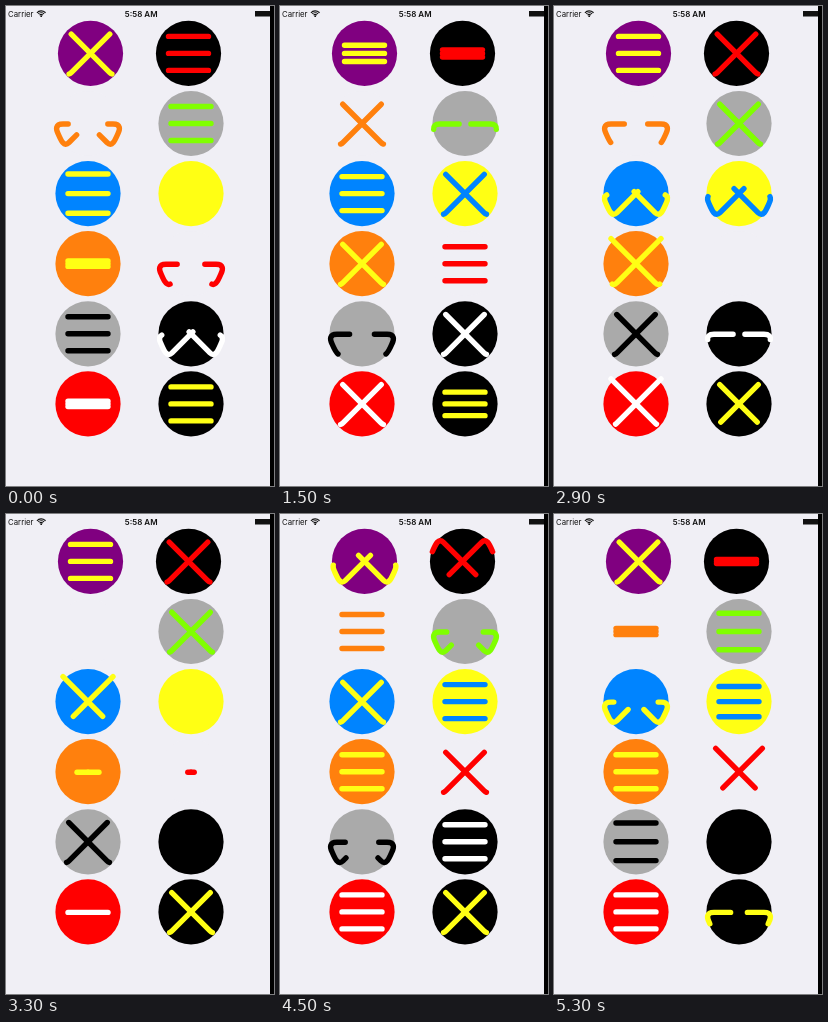
An HTML page with a canvas for the animation above (5400 ms loop, 268 px wide and 480 px high).

```html
<!DOCTYPE html>
<html lang="en">
<head>
<meta charset="utf-8">
<title>Menu buttons</title>
<style>
  html, body { margin: 0; width: 100%; height: 100%; overflow: hidden; background: #f0eff5; }
  canvas { display: block; width: 268px; height: 480px; }
</style>
</head>
<body>
<canvas id="stage"></canvas>
<script>
const W = 268, H = 480, LOOP = 5400, STEP = 100;
const canvas = document.getElementById('stage');
const ctx = canvas.getContext('2d');
const ratio = window.devicePixelRatio || 1;
canvas.width = W * ratio;
canvas.height = H * ratio;

const BACK = '#f0eff5', PURPLE = '#800080', YELLOW = '#ffff14', RED = '#ff0000',
  ORANGE = '#ff800d', BLUE = '#0084ff', GRAY = '#aaaaaa', GREEN = '#80ff00',
  BLACK = '#000', WHITE = '#fff';

// The arm runs from the centre to the rim, round the corner and up a diagonal.
const arm = new Path2D(
  'M0 0.5 L-25 0.5 C-33 0.5 -32 6 -30 10 C-27 17 -24 24 -19 19 L25 -25');
const mirroredArm = new Path2D();
mirroredArm.addPath(arm, new DOMMatrix([-1, 0, 0, 1, 0, 0]));

const GAP = 17;                      // spacing of the resting bars
const CROSS = { tail: 53.5, head: 110.5 };  // part of the arm that forms the cross
const COLLAPSE = 360, SWEEP = 1220, TAIL_DELAY = 80;
const TOTAL = COLLAPSE + TAIL_DELAY + SWEEP;
const SPREAD = { start: 1180, show: 1300, length: 420 };

// Cubic Bezier (0.5, -0.8, 0.5, 1.85): pulls back first, then overshoots.
function swing(x) {
  if (x <= 0) return 0;
  if (x >= 1) return 1;
  let low = 0, high = 1;
  for (let i = 0; i < 24; i++) {
    const mid = (low + high) / 2;
    if (mid * (1.5 - 1.5 * mid + mid * mid) < x) low = mid;
    else high = mid;
  }
  const s = low, r = 1 - s;
  return s * (-2.4 * r * r + 5.55 * r * s + s * s);
}

// Taps alternate between opening to a cross and closing to bars.
const button = (fill, ink, opensFirst, taps, extra) => ({ fill, ink, opensFirst, taps, ...extra });
const buttons = [
  button(PURPLE, YELLOW, false, [115, 3420], { dx: 2.5 }),
  button(BLACK, RED, true, [1180, 3960], { dx: -2.5, closesUpward: true }),
  button(BACK, ORANGE, true, [-1000, 2185, 4975]),
  button(GRAY, GREEN, true, [600, 3830]),
  button(BLUE, YELLOW, false, [-1500, 1840, 4655]),
  button(YELLOW, BLUE, true, [-450, 2315, 5180]),
  button(ORANGE, YELLOW, true, [-330, 2455]),
  button(BACK, RED, false, [-700, 2520, 5180]),
  button(GRAY, BLACK, true, [550, 3820]),
  button(BLACK, WHITE, true, [-1060, 2140, 4850]),
  button(RED, WHITE, true, [-330, 2490]),
  button(BLACK, YELLOW, true, [1300, 4560])
];

function phaseOf({ opensFirst, taps }, t) {
  const done = taps.filter(tap => tap <= t).length;
  const opening = opensFirst === (done % 2 === 1);
  return { opening, age: done ? t - taps[done - 1] : LOOP };
}

function drawBars(gap) {
  ctx.beginPath();
  for (const y of [-gap, 0, gap]) {
    ctx.moveTo(-20, y);
    ctx.lineTo(20, y);
  }
  ctx.stroke();
}

// Closing plays the same sweep backwards.
function drawArms(t) {
  const tail = Math.max(0, CROSS.tail * swing((t - COLLAPSE - TAIL_DELAY) / SWEEP));
  const head = CROSS.head * swing((t - COLLAPSE) / SWEEP);
  if (head <= tail) return;
  ctx.setLineDash([head - tail, 500]);
  ctx.lineDashOffset = -tail;
  ctx.stroke(arm);
  ctx.stroke(mirroredArm);
  ctx.setLineDash([]);
}

function drawIcon(opening, age) {
  if (opening && age < COLLAPSE) drawBars(GAP * (1 - (age / COLLAPSE) ** 2));
  else if (opening) drawArms(age);
  else if (age < SPREAD.show) drawArms(TOTAL - age);
  else drawBars(GAP * Math.max(0, swing((age - SPREAD.start) / SPREAD.length)));
}

function drawButton(item, index, t) {
  const { opening, age } = phaseOf(item, t);
  ctx.save();
  ctx.translate((index % 2 ? 185 : 82) + (item.dx || 0), 47.4 + 70.1 * Math.floor(index / 2));
  ctx.fillStyle = item.fill;
  ctx.beginPath();
  ctx.arc(0, 0, 32.6, 0, Math.PI * 2);
  ctx.fill();

  ctx.strokeStyle = item.ink;
  ctx.lineWidth = 5.4;
  ctx.lineCap = ctx.lineJoin = 'round';
  if (item.closesUpward && !opening) ctx.scale(1, -1);
  drawIcon(opening, age);
  ctx.restore();
}

function drawStatusBar() {
  ctx.fillStyle = ctx.strokeStyle = '#111';
  ctx.textBaseline = 'alphabetic';
  ctx.textAlign = 'left';
  ctx.font = '7.8px Inter, sans-serif';
  ctx.fillText('Carrier', 2, 11);
  ctx.textAlign = 'center';
  ctx.font = '600 8px Inter, sans-serif';
  ctx.fillText('5:58 AM', 135.2, 11);

  ctx.lineWidth = 1.1;
  ctx.lineCap = 'butt';
  for (const r of [2.3, 4.1, 5.9]) {
    ctx.beginPath();
    ctx.arc(35.2, 10.8, r, -Math.PI * 0.76, -Math.PI * 0.24);
    ctx.stroke();
  }
  ctx.beginPath();
  ctx.arc(35.2, 10.2, 0.9, 0, Math.PI * 2);
  ctx.fill();
  ctx.fillRect(249, 5, 15, 5.5);
}

function draw(t) {
  ctx.setTransform(ratio, 0, 0, ratio, 0, 0);
  ctx.fillStyle = BACK;
  ctx.fillRect(0, 0, W, H);
  drawStatusBar();
  buttons.forEach((item, index) => drawButton(item, index, t));
  ctx.fillStyle = BLACK;
  ctx.fillRect(264, 0, 4, H);
}

const start = performance.now();
function tick() {
  const t = (performance.now() - start) % LOOP;
  draw(Math.floor(t / STEP) * STEP);
  requestAnimationFrame(tick);
}
tick();
</script>
</body>
</html>
```
